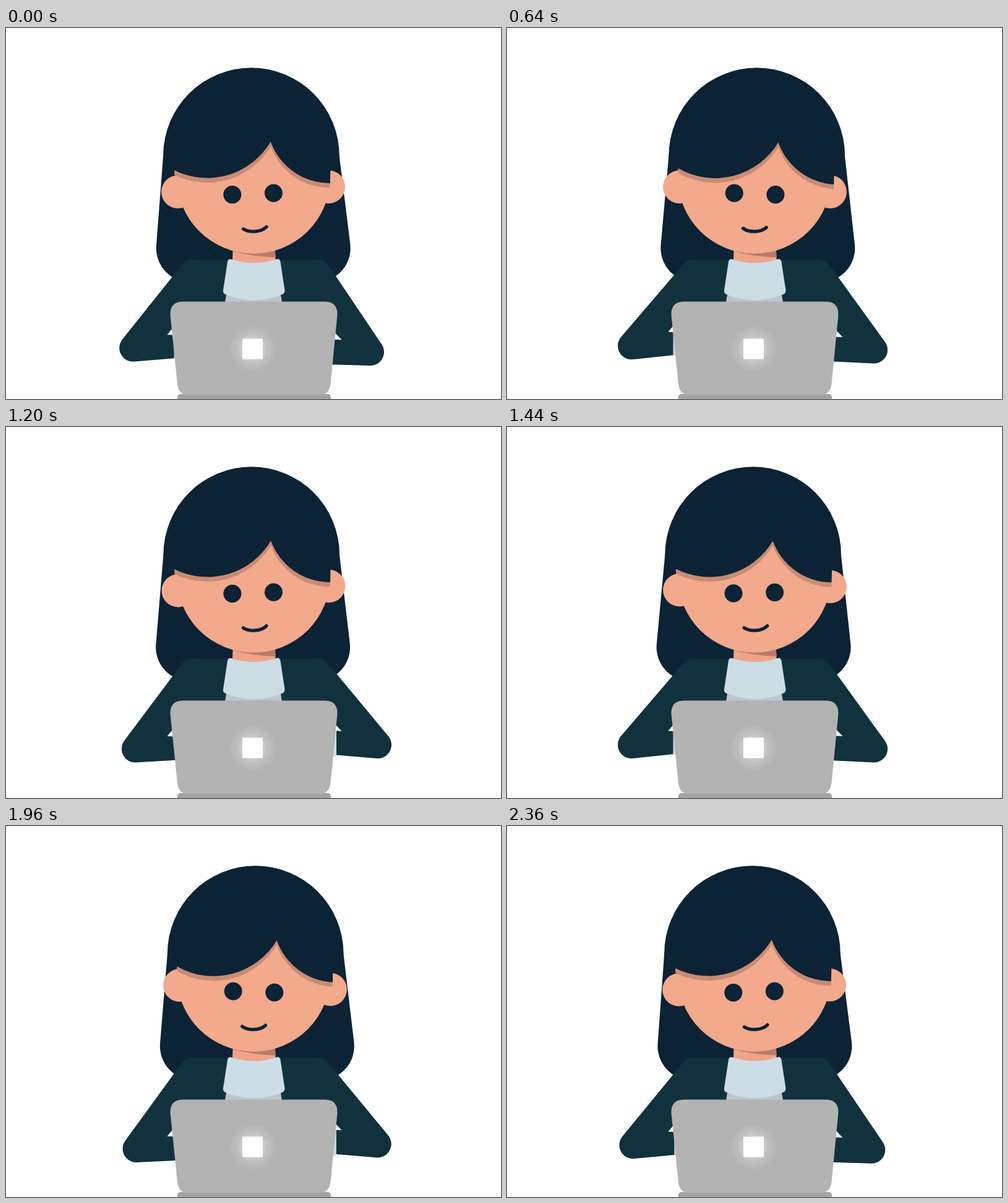
Write an HTML page with a canvas that moves like this. It is 800 by 600 pixels and loops after 2.4 s.

```html
<!DOCTYPE html>
<html lang="en">
<head>
<meta charset="utf-8">
<title>Working at a laptop</title>
<style>
  html, body { margin: 0; height: 100%; overflow: hidden; background: #fff; }
  canvas { display: block; }
</style>
</head>
<body>
<canvas id="stage" width="800" height="600"></canvas>
<script>
const ctx = document.getElementById('stage').getContext('2d');
const LOOP = 2400, STEP = 40;
const HAIR = '#0c2235', JACKET = '#11313d', SKIN = '#f2a98c', SHADE = '#c88b75',
      SHIRT = '#cddde6', METAL = '#b3b3b3';

// Times and values of the turning points, eased with half cosines.
const SWAY = [[0, 0], [660, 1], [1280, 0], [1860, 1], [2400, 0]];
const TRAIL = [[-420, 1], [180, 0], [730, 1], [1340, 0], [1980, 1], [2580, 0]];
const NUDGE = [[0, 0], [360, 1], [640, 1], [1000, 0], [1440, 1], [1960, 3], [2400, 0]];
const BLINK = [[0, 1], [920, 1], [1040, .22], [1160, 1], [2400, 1]];

function ease(keys, t) {
  const i = keys.findIndex(k => k[0] > t);
  const [t0, a] = keys[i - 1], [t1, b] = keys[i];
  return a + (b - a) * (1 - Math.cos(Math.PI * (t - t0) / (t1 - t0))) / 2;
}

const wave = (t, delay) => Math.sin(2 * Math.PI * (t - delay) / 800);

function shape(d, color) {
  ctx.fillStyle = color;
  ctx.fill(new Path2D(d));
}

function oval(x, y, rx, ry, color) {
  ctx.fillStyle = color;
  ctx.beginPath();
  ctx.ellipse(x, y, rx, ry, 0, 0, 2 * Math.PI);
  ctx.fill();
}

function line(d, color, width) {
  ctx.strokeStyle = color;
  ctx.lineWidth = width;
  ctx.lineCap = ctx.lineJoin = 'round';
  ctx.stroke(new Path2D(d));
}

function box(x, y, w, h, r, color) {
  ctx.fillStyle = color;
  ctx.beginPath();
  ctx.roundRect(x, y, w, h, r);
  ctx.fill();
}

function arm(shoulder, elbow, wrist) {
  const d = `M${shoulder}L${elbow}L${wrist}Z`;
  shape(d, JACKET);
  line(d, JACKET, 44);
}

function backHair(sway, trail) {
  const x = 241.3 + 7.7 * trail, top = 254.3 + 7.4 * sway;
  shape(`M${top} 204L${x} 352A55 55 0 0 0 ${x + 55} 411H${x + 258.5}
    A55 55 0 0 0 ${x + 313.5} 350L${top + 284} 204Z`, HAIR);
  oval(396.4 + 7.4 * sway, 206.6, 142.3, 142.3, HAIR);
}

function body(t) {
  const l = wave(t, 40), r = wave(t, 200);

  box(300, 375, 203, 180, 0, JACKET);
  arm([302, 396], [207 + 6 * l, 519 + 5 * l], [300, 512.5 + 9 * l]);
  arm([503, 396], [595 + 6 * r, 519 - 5 * r], [500, 513.5 - 8 * r]);

  const gapL = 498 + 6.5 * l, gapR = 498 - 6.3 * r;
  box(273 + 4.5 * l, gapL, 20, 38.5, 0, SHIRT);
  box(509.5 + 4.5 * r, gapR, 20, 41, 0, SHIRT);
  shape(`M260.5 ${gapL}L271 ${gapL - 12.5}V${gapL + .5}Z`, '#fff');
  shape(`M542.5 ${gapR}L531 ${gapR - 12}V${gapR - .5}Z`, '#fff');

  shape('M367 350H434L437 395H365Z', '#efa48a');
  shape('M367 350H434L436 371Q398 370 367 361Z', '#b97c69');
  shape('M357 425L353 450H447L443 425Z', '#bfc6c9');
  shape(`M358 378Q359 373 364 374Q401 386 437 374Q442 372 443.5 378L450.5 424
    Q451 429 446 431Q401 449 355 431Q350 429 351 424Z`, SHIRT);
}

function head(t, sway) {
  const nudge = ease(NUDGE, t), tilt = 4 - 8 * sway;
  oval(277.8 + nudge, 261 + tilt, 26.7, 26.7, SKIN);
  oval(521.3 + nudge, 261 - tilt, 26.7, 26.7, SKIN);
  oval(400, 241, 124, 124, SKIN);

  const left = 272 + 5 * sway, leftY = 230 - 3 * sway;
  const right = 523.8 + 4.4 * sway, drop = 7.5;
  const edge = `M${left} ${leftY}
    A119 119 0 0 0 ${427.7 + 10.8 * sway} ${184 + sway}
    A102 102 0 0 0 ${right} ${251 + 2 * sway}`;
  ctx.save();
  ctx.translate(0, drop);
  shape(`${edge}v${-drop}L460 90H340L${left} ${leftY - drop}Z`, SHADE);
  ctx.restore();
  shape(`${edge}L${right + 1.5} 190L460 90H340L${left} 190Z`, HAIR);

  const open = ease(BLINK, t), ry = 14.5 * open, slant = (1.2 - 2.4 * sway) * open;
  const eyeY = 282.8 - ry, shift = 1.5 * sway;
  oval(365.8 + shift, eyeY + slant, 14.5, ry, HAIR);
  oval(432.4 + shift, eyeY - slant, 14.5, ry, HAIR);
  line(`M${383.6 - 2 * sway} ${325 - sway}
    C${393 - 2 * sway} 331 ${412 - 2 * sway} 331 ${421 - 1.8 * sway} ${321.5 + sway}`, HAIR, 5.4);
}

function laptop() {
  box(277, 592, 248, 14, 5, '#a3a3a3');
  shape(`M285 442.5H516Q536 443 535.5 464L524.5 576Q522 593 508 593H293
    Q279 593 277 576L265.5 464Q265 443 285 442.5Z`, METAL);
  const glow = ctx.createRadialGradient(398.5, 519, 14, 398.5, 519, 38);
  glow.addColorStop(0, 'rgba(255,255,255,.45)');
  glow.addColorStop(.4, 'rgba(255,255,255,.18)');
  glow.addColorStop(1, 'rgba(255,255,255,0)');
  oval(398.5, 519, 38, 38, glow);
  box(382, 502.5, 33, 33, 0, '#fff');
}

function draw(now) {
  const t = Math.floor(now % LOOP / STEP) * STEP;
  const sway = ease(SWAY, t);
  ctx.clearRect(0, 0, 800, 600);
  backHair(sway, ease(TRAIL, t));
  body(t);
  head(t, sway);
  laptop();
  requestAnimationFrame(draw);
}
requestAnimationFrame(draw);
</script>
</body>
</html>
```
